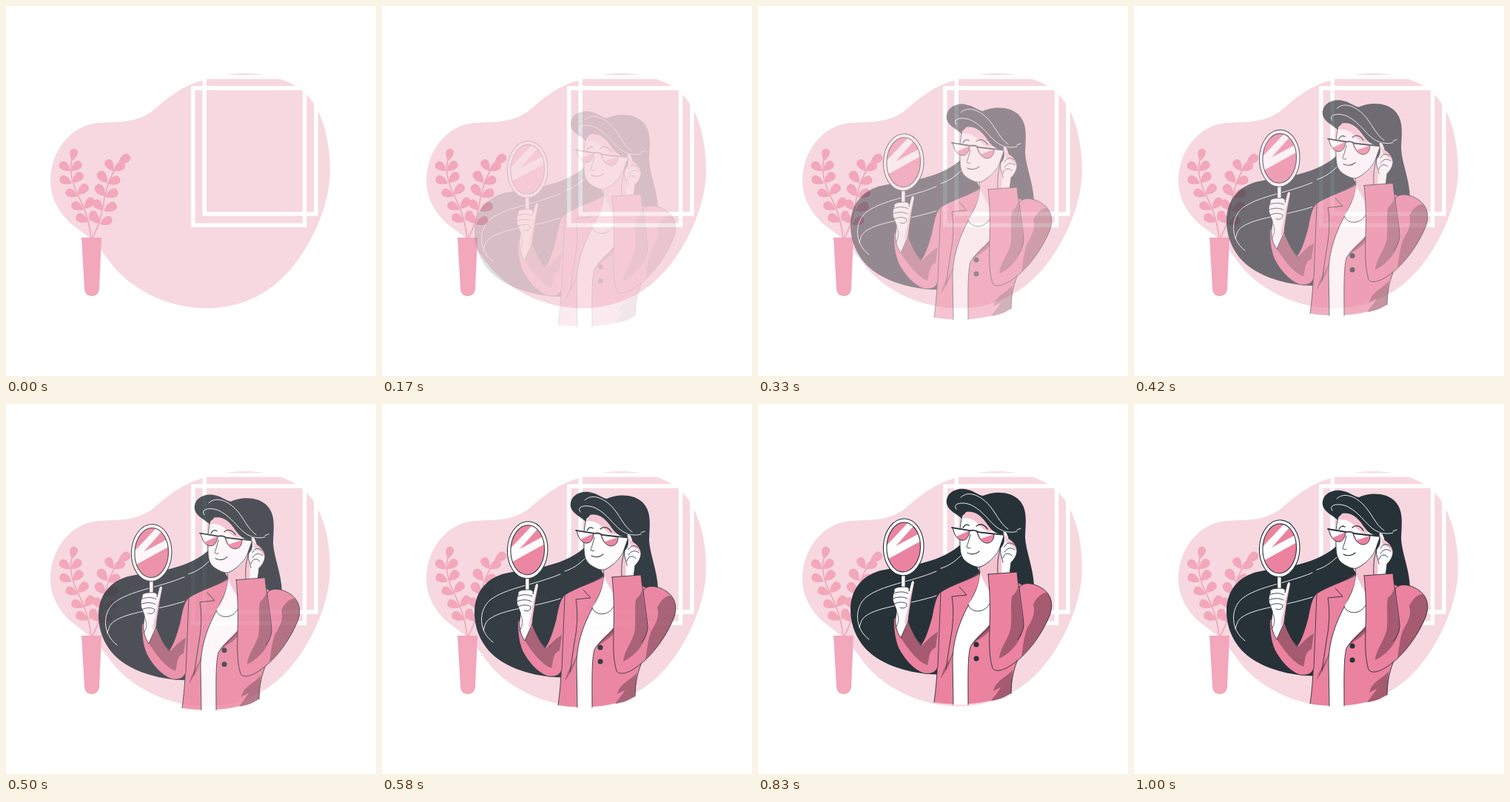
Recreate the animation shown at these times as an HTML page with a canvas. Size 500 px wide and 500 px high, loop 1.04 s.

```html
<!DOCTYPE html>
<html lang="en">
<head>
<meta charset="utf-8">
<title>Woman with a hand mirror</title>
<style>
  html, body { margin: 0; width: 100%; height: 100%; overflow: hidden; background: #fff; }
  canvas { display: block; width: 500px; height: 500px; }
</style>
</head>
<body>
<canvas id="stage"></canvas>
<script>
const SIZE = 500, LOOP = 1040, FRAME = 1000 / 24;
const PINK = '#eb829f', SHADE = '#a45b6f', DARK = '#263238', WHITE = '#fff';
const BLOB = '#f7d8e0', PLANT = '#f2a7bb', BLUSH = '#f7c3d1';

const scale = window.devicePixelRatio || 1;
const setup = canvas => {
  canvas.width = canvas.height = SIZE * scale;
  const c = canvas.getContext('2d');
  c.lineCap = c.lineJoin = 'round';
  return c;
};
const stage = setup(document.getElementById('stage'));
const backdrop = document.createElement('canvas');
const figure = document.createElement('canvas');
const back = setup(backdrop), fig = setup(figure);

function fill(c, color, d) {
  c.fillStyle = color;
  c.fill(new Path2D(d));
}
function line(c, color, width, d) {
  c.strokeStyle = color;
  c.lineWidth = width;
  c.stroke(new Path2D(d));
}
function part(color, d, width = 0.9) {
  fill(fig, color, d);
  line(fig, DARK, width, d);
}
const ink = (d, width = 0.9) => line(fig, DARK, width, d);
const shade = d => fill(fig, SHADE, d);
const blush = d => fill(fig, BLUSH, d);

// Teardrop leaf from its base on the stem to its tip
function leaf(x, y, tipX, tipY) {
  back.save();
  back.translate(x, y);
  back.rotate(Math.atan2(tipY - y, tipX - x));
  const len = Math.hypot(tipX - x, tipY - y);
  back.scale(len, len);
  fill(back, PLANT, 'M0 0C.2-.17 .4-.32 .68-.32C.92-.32 1-.14 1 0C1 .14 .92 .32 .68 .32C.4 .32 .2 .17 0 0Z');
  back.restore();
}

function drawBackdrop() {
  back.setTransform(scale, 0, 0, scale, 0, 0);
  back.fillStyle = WHITE;
  back.fillRect(0, 0, SIZE, SIZE);
  fill(back, BLOB, `M60 236C60 196 88 160 126 158C150 156 172 159 195 144
    C208 135 222 118 252 105C276 96 298 91 322 91C350 91 380 98 400 114
    C426 135 438 178 438 222C438 270 411 329 377 364C350 392 312 408.500 272 408.500
    C222 408.500 175 386 147 354C138 343 130 330 118 318C100 301 84 295 73 277
    C64 264 60 250 60 236Z`);

  back.lineJoin = 'miter';
  back.strokeStyle = WHITE;
  back.lineWidth = 5.5;
  back.strokeRect(252.8, 111, 150.7, 185.2);
  back.strokeRect(268.2, 95.8, 150.7, 185.2);
  back.lineJoin = 'round';

  line(back, PLANT, 1.7, 'M115 314C113 291 106 272 97 255C89 238 85 222 89 208');
  line(back, PLANT, 1.7, 'M116 314C127 296 130 278 133 260C137 240 144 223 154 212');
  [
    [89, 209, 93, 193], [87, 223, 73, 212], [88, 223, 101, 211],
    [89, 240, 73, 232], [90, 239, 103, 226], [97, 257, 81, 250],
    [97, 255, 110, 242], [105, 275, 89, 267], [106, 274, 118, 260],
    [111, 292, 95, 283], [113, 291, 120, 277], [152, 213, 167, 202],
    [145, 223, 136, 208], [145, 223, 160, 213], [137, 239, 125, 224],
    [137, 240, 154, 233], [134, 257, 122, 242], [134, 258, 151, 250],
    [131, 276, 119, 263], [132, 277, 149, 268], [127, 294, 115, 281],
    [127, 295, 143, 287]
  ].forEach(p => leaf(...p));
  fill(back, PLANT, 'M102 313H129L126 383C125 389 121 392 116 392C110 392 106 388 106 382Z');
}

function drawHair() {
  fill(fig, DARK, `M276 190C263 202 246 211 222 217C204 221 184 223 166 227
    C146 232 125 248 125 280C125 305 137 328 156 342C178 358 210 367 243 367.500
    L262 300L302 232Z`);
  fill(fig, DARK, `M276 158C270 150 258 148 255 137C253 123 266 115 280 117
    C292 119 297 125 304 126C316 120 342 118 354 133C364 145 362 160 361 182
    C362 202 372 222 373 248L340 262L322 235L326 190L300 190Z`);
  [
    'M274 207C266 215 257 221 247 224',
    'M241 228C205 243 168 246 146 263C130 277 130 305 150 320',
    'M241 261C200 274 165 275 146 288C139 293 139 298 137 304'
  ].forEach(d => line(fig, WHITE, 0.9, d));
}

function drawHead() {
  fill(fig, WHITE, 'M299 216L300 232C298 250 292 262 284 273L300 284L313 280L327 232V190Z');
  blush('M299 222C313 217 322 209 327 198V232H312L313 256C307 243 300 236 299 222Z');
  ink('M299 220L300 231M327 196V232', 0.7);
  part(WHITE, `M276 153C272 168 273 180 273 192C273 206 276 212 284 217
    C291 221 297 224 303 221C314 215 324 205 327 195L333 178
    C322 178 315 172 310 165C302 152 292 146 282 148Z`);
  blush('M281 148C294 146 302 153 310 165L317 174C308 176 303 170 298 165C292 157 284 156 276 156Z');
  ink('M277 169C279 165 282 164 285 166M295 167C299 163 306 164 310 171', 1.3);
  ink('M287 178C285 187 283 192 282 195C283 197 285 197 287 196');
  ink('M283 203C288 206 295 205 299 201', 1.1);

  const lenses = [
    'M263 169L286 173C285 182 281 187 275 186C268 184 265 178 263 169Z',
    'M296 175L319 178C319 186 315 190 309 190C302 189 298 183 296 175Z'
  ];
  for (const d of lenses) fill(fig, PINK, d);
  fill(fig, WHITE, 'M263 169L286 173L268 181ZM297 175L319 178L301 184Z');
  for (const d of lenses) ink(d);
  ink('M262 169L287 173C291 172 295 173 298 175L335 179', 1.8);

  [
    'M268 144C261 135 280 133 291 140C304 147 312 160 322 168C332 176 344 176 350 174',
    'M274 128C283 119 298 124 310 136C321 147 326 163 338 171M350 172L355 170'
  ].forEach(d => line(fig, WHITE, 0.9, d));
}

function drawJacket() {
  fill(fig, PINK, `M300 230C285 240 262 246 247 256C242 262 243 275 243 300
    C243 340 243 370 238 405C272 411 315 407 342 393C342 375 346 358 352 345
    L380 260L345 240L312 232Z`);
  fill(fig, WHITE, `M300 231C299 248 293 256 288 267C277 287 263 315 263 350L264 408.500H284
    C284 375 283 345 287 330C292 320 312 311 313 300V232Z`);
  shade('M313 300C305 310 294 317 289 327C298 320 308 315 313 308Z');
  shade('M264 335C259 350 250 358 247 373C254 362 261 352 264 335Z');
  shade(`M344 361C336 372 322 374 318 390C322 388 324 386 328 385
    C322 395 318 398 315 403C326 402 336 397 342 393Z`);
  [
    'M300 231C285 240 262 246 247 256C242 262 243 275 243 300C243 340 243 370 238 405',
    'M342 393C342 375 346 358 352 345',
    'M300 231C299 248 293 256 288 267C277 287 263 315 263 350L264 408',
    'M284 408C284 375 283 345 287 330C292 320 308 310 313 302',
    'M272 249L282 260L262 262C265 280 264 300 260 320L254 360'
  ].forEach(d => ink(d));
  fig.fillStyle = DARK;
  for (const y of [327, 346]) {
    fig.beginPath();
    fig.arc(295, y, 3.5, 0, 7);
    fig.fill();
  }
}

function drawLeftArm() {
  const sleeve = `M184 291C183 306 185 320 190 332C198 347 210 361 224 366
    C232 367 240 366 243 357L247 256C240 262 238 275 235 290
    C230 308 226 320 220 328C214 320 207 308 203 296Z`;
  fill(fig, PINK, sleeve);
  shade(`M203 298L193 318C205 336 216 350 229 355C232 345 230 336 240 331
    L243 310C233 316 226 324 222 328C214 320 207 310 203 298Z`);
  ink(sleeve, 0.8);

  part(WHITE, 'M194 232H199V252H194Z');
  const hand = `M184 255C183 250 188 249 200 249C204 250 205 252 204 255L207 243
    C209 239 212 240 211 245L207 266C206 275 204 283 203 295L193 318
    C187 310 184 298 187 284C188 280 186 278 184 272C181 266 182 260 184 255Z`;
  fill(fig, WHITE, hand);
  blush('M211 243L207 266C206 275 204 283 203 295L198 300C199 288 203 280 204 266Z');
  ink(hand);
  ink('M183 258C190 255 197 255 203 258M182 265C189 262 197 262 202 265M184 272C190 269 197 269 201 272C201 277 197 279 192 277');
  ink('M188 284C191 292 190 299 186 304', 0.7);
}

function drawMirror() {
  const oval = (rx, ry) => {
    fig.beginPath();
    fig.ellipse(196.7, 195.3, rx, ry, 0.04, 0, 7);
  };
  fig.strokeStyle = DARK;
  fig.lineWidth = 1.1;
  oval(27.3, 38.5);
  fig.fillStyle = WHITE;
  fig.fill();
  fig.stroke();
  fig.save();
  oval(22.8, 33.5);
  fig.fillStyle = PINK;
  fig.fill();
  fig.clip();
  fill(fig, WHITE, 'M170 197L204 161L211 166L186 194L218 177L222 186L173 213Z');
  fig.restore();
  oval(22.8, 33.5);
  fig.stroke();
}

function drawRightArm() {
  const hand = `M331 175C334 171 337 176 339 184C346 188 350 195 350 201
    C349 208 346 212 342 216L340 232H324C323 215 325 205 328 196
    C334 190 333 183 331 175Z`;
  fill(fig, WHITE, hand);
  blush('M324 232C323 215 325 205 328 196C327 206 331 214 329 232Z');
  blush('M332 176L338 184C346 188 350 195 350 201L344 194L336 190Z');
  ink(hand);
  ink('M333 195C336 189 341 188 346 192M333 202C337 196 342 195 347 199M331 210C333 203 339 202 343 207M328 196C326 203 330 209 331 216');
  const sleeve = `M311 232L350 229C351 240 352 248 353 250C358 242 372 243 384 251
    C396 259 400 272 394 288C384 312 366 338 346 352C336 360 322 366 317 359
    C311 340 313 315 313 300C314 275 313 250 311 232Z`;
  fill(fig, PINK, sleeve);
  shade(`M343 262C349 257 351 252 352 247C354 270 358 290 359 302
    C356 320 345 337 326 346C328 328 341 318 342 300C343 285 341 275 343 262Z`);
  shade(`M390 257C397 264 399 276 394 288C386 308 372 328 356 343
    C358 332 359 318 363 307C368 297 376 287 372 273C376 264 383 257 390 257Z`);
  ink(sleeve);
  ink('M353 250C355 270 359 290 359 302C358 309 355 315 351 320');
}

function drawFigure(dy) {
  fig.setTransform(1, 0, 0, 1, 0, 0);
  fig.clearRect(0, 0, figure.width, figure.height);
  fig.setTransform(scale, 0, 0, scale, 0, dy * scale);
  drawHair();
  drawJacket();
  drawHead();
  ink('M284 273C287 284 305 286 313 272');
  drawLeftArm();
  drawMirror();
  drawRightArm();
}

// cubic-bezier(.36, -.01, .5, 1.38)
function ease(x) {
  if (x >= 1) return 1;
  const curve = (a, b, s) => 3 * (1 - s) * s * ((1 - s) * a + s * b) + s ** 3;
  let lo = 0, hi = 1;
  for (let i = 0; i < 24; i++) {
    const mid = (lo + hi) / 2;
    if (curve(0.36, 0.5, mid) < x) lo = mid; else hi = mid;
  }
  return curve(-0.01, 1.38, lo);
}

function draw(time) {
  const step = Math.min(24, Math.floor((time % LOOP + 5) / FRAME));
  stage.globalAlpha = 1;
  stage.drawImage(backdrop, 0, 0);
  if (step >= 2) {
    const p = ease((step * FRAME + 36) / 1000);
    drawFigure(30 * (1 - p));
    stage.globalAlpha = Math.max(0, Math.min(1, p));
    stage.drawImage(figure, 0, 0);
  }
}

drawBackdrop();
const start = performance.now();
function tick() {
  draw(performance.now() - start);
  requestAnimationFrame(tick);
}
tick();
</script>
</body>
</html>
```
